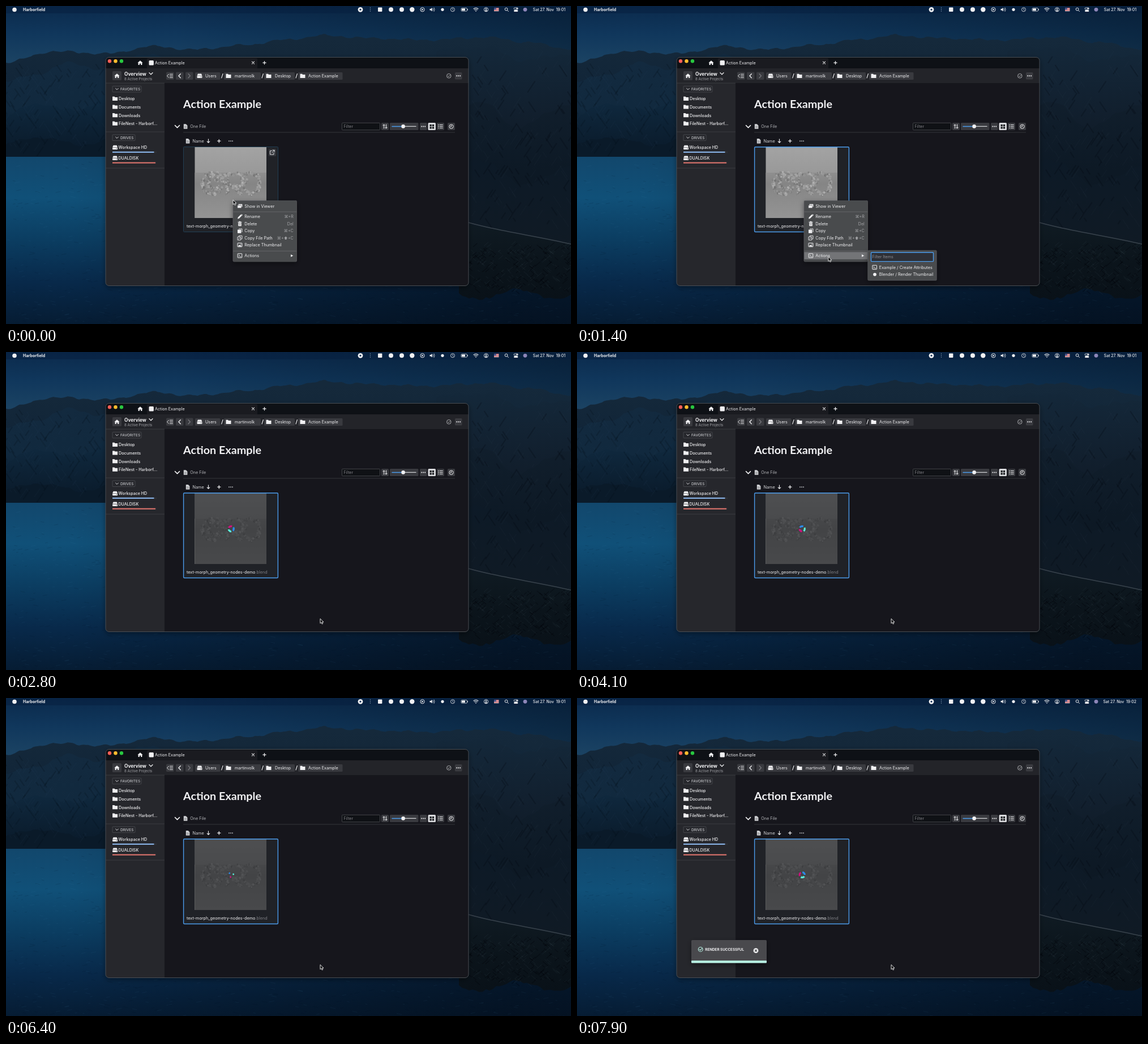
An HTML page with a canvas that plays this animation: 998x561 px, repeating every 8000 ms.

```html
<!DOCTYPE html>
<html lang="en">
<head>
<meta charset="utf-8">
<title>Context menu action</title>
<style>
html, body { margin: 0; width: 100%; height: 100%; overflow: hidden; background: #081c30; }
canvas, svg { position: absolute; left: 0; top: 0; width: 998px; height: 561px; display: block; }
text { font-family: Inter, "DejaVu Sans", sans-serif; white-space: pre; }
.title { font-family: Lato, sans-serif; }
</style>
</head>
<body>
<canvas id="scene" width="998" height="561"></canvas>
<svg id="ui" viewBox="0 0 998 561"></svg>
<script>
const LOOP = 8000, STEP = 100;

/* ---------- helpers ---------- */
function seeded(seed) {
  return () => {
    seed = (seed + 0x6d2b79f5) | 0;
    let t = Math.imul(seed ^ (seed >>> 15), 1 | seed);
    t = (t + Math.imul(t ^ (t >>> 7), 61 | t)) ^ t;
    return ((t ^ (t >>> 14)) >>> 0) / 4294967296;
  };
}
const clamp01 = v => Math.max(0, Math.min(1, v));
const progress = (t, a, b) => clamp01((t - a) / (b - a));
const smooth = x => x * x * (3 - 2 * x);
const mix = (a, b, k) => a + (b - a) * k;

/* ---------- landscape ---------- */
function paintScene() {
  const c = document.getElementById('scene').getContext('2d');
  const rnd = seeded(11);
  const grad = (x0, y0, x1, y1, ...stops) => {
    const g = c.createLinearGradient(x0, y0, x1, y1);
    stops.forEach((s, i) => g.addColorStop(i / (stops.length - 1), s));
    return g;
  };
  const fillRect = (fill, x, y, w, h) => { c.fillStyle = fill; c.fillRect(x, y, w, h); };
  const ridge = (pts, bottom, amp, fill) => {
    c.beginPath();
    c.moveTo(pts[0][0], bottom);
    for (let i = 1; i < pts.length; i++) {
      const [x0, y0] = pts[i - 1], [x1, y1] = pts[i];
      for (let x = x0; x <= x1; x += 4) {
        const bump = Math.sin(x * .21) + Math.sin(x * .083 + 2) + rnd() - .5;
        c.lineTo(x, mix(y0, y1, smooth((x - x0) / (x1 - x0))) + bump * amp);
      }
    }
    c.lineTo(pts[pts.length - 1][0], bottom);
    c.fillStyle = fill;
    c.fill();
  };
  const strokes = (n, x, y, w, h, dx, dy, colors) => {
    for (let i = 0; i < n; i++) {
      const px = x + rnd() * w, py = y + rnd() * h, k = .4 + rnd();
      c.strokeStyle = colors[i % colors.length];
      c.beginPath();
      c.moveTo(px, py);
      c.lineTo(px + dx * k, py + dy * k * (rnd() < .5 ? -1 : 1));
      c.stroke();
    }
  };

  fillRect(grad(0, 0, 0, 100, '#0b2a4c', '#10375c', '#1b4363'), 0, 0, 998, 110);
  fillRect(grad(300, 0, 998, 0, 'rgba(4,16,28,0)', 'rgba(4,16,28,.4)'), 0, 0, 998, 110);

  ridge([[0, 99], [85, 80], [180, 84], [260, 71], [330, 77], [420, 69], [490, 60], [560, 52],
    [650, 57], [740, 60], [850, 55], [920, 64], [1000, 76]], 300, 1.2, grad(0, 60, 0, 270, '#15293b', '#102437', '#0a1826'));
  ridge([[0, 132], [50, 122], [110, 100], [170, 112], [240, 86], [300, 92]], 300, 1.5,
    grad(0, 90, 0, 270, '#132a3f', '#11293e', '#091725'));
  ridge([[0, 190], [60, 172], [120, 186], [190, 156]], 290, 2, grad(0, 160, 0, 270, '#102a40', '#091827'));
  ridge([[0, 240], [70, 232], [130, 246], [190, 236]], 290, 1.5, '#0a1a29');
  c.lineWidth = 2;
  strokes(150, 0, 110, 176, 140, -9, 13, ['rgba(4,12,22,.22)', 'rgba(45,80,105,.08)']);

  fillRect(grad(0, 264, 0, 561, '#12476c', '#105078', '#0b3d61', '#08294a', '#061c33'), 0, 266, 998, 295);
  fillRect(grad(120, 0, 900, 0, 'rgba(3,12,24,0)', 'rgba(3,12,24,.62)'), 0, 266, 998, 295);
  c.lineWidth = 1;
  strokes(1000, 0, 272, 998, 289, 7, 1.5, ['rgba(90,160,200,.07)', 'rgba(0,10,26,.13)']);

  ridge([[760, 78], [850, 72], [910, 96], [1000, 84]], 340, 2, grad(0, 70, 0, 340, '#14283a', '#111e2c', '#0d1824'));
  ridge([[760, 190], [840, 168], [900, 214], [1000, 172]], 420, 2, grad(0, 160, 0, 420, '#111f2d', '#0d1925', '#0d1721'));
  ridge([[760, 300], [830, 270], [920, 315], [1000, 280]], 440, 2, grad(0, 270, 0, 440, '#0d1a27', '#101a24'));
  c.lineWidth = 2;
  strokes(170, 817, 95, 181, 290, 10, 15, ['rgba(3,9,16,.25)', 'rgba(60,82,100,.06)']);
  c.beginPath();
  c.moveTo(800, 382);
  c.lineTo(998, 421);
  c.lineTo(998, 503);
  for (let x = 998; x >= 800; x -= 6) c.lineTo(x, 506 + 9 * Math.sin(x * .047) + 5 * rnd());
  c.fillStyle = grad(0, 390, 0, 520, '#0f1a22', '#0b141b', '#091118');
  c.fill();
  c.lineWidth = 1.2;
  strokes(300, 817, 420, 181, 84, 7, 6, ['rgba(70,88,96,.13)', 'rgba(0,4,8,.35)']);
  c.strokeStyle = '#38424b';
  c.lineWidth = 1.5;
  c.beginPath();
  c.moveTo(800, 377);
  c.bezierCurveTo(860, 396, 930, 404, 998, 420);
  c.stroke();

  fillRect('rgba(7,30,62,.5)', 0, 0, 998, 13);
}

/* ---------- vector helpers ---------- */
const WHITE = '#f0f0f2', GREY = '#a3a4a8', BUTTON = '#393a3f', BLUE = '#4b9cec', PANEL = '#4a4b4e';
const text = (x, y, s, size = 7.2, fill = WHITE, weight = 400, more = '') =>
  `<text x="${x}" y="${y}" font-size="${size}" fill="${fill}" font-weight="${weight}" ${more}>${s}</text>`;
const rect = (x, y, w, h, fill, r = 0, more = '') =>
  `<rect x="${x}" y="${y}" width="${w}" height="${h}" rx="${r}" fill="${fill}" ${more}/>`;
const line = (d, stroke = WHITE, w = 1) =>
  `<path d="${d}" fill="none" stroke="${stroke}" stroke-width="${w}" stroke-linecap="round" stroke-linejoin="round"/>`;
const shape = (d, fill = WHITE) => `<path d="${d}" fill="${fill}"/>`;
const disc = (x, y, r, fill = WHITE, more = '') => `<circle cx="${x}" cy="${y}" r="${r}" fill="${fill}" ${more}/>`;
const ring = (x, y, r, stroke = WHITE, w = 1) => disc(x, y, r, 'none', `stroke="${stroke}" stroke-width="${w}"`);
const group = (id, body) => `<g id="${id}">${body}</g>`;

const folder = (x, y) => shape(`M${x - 4.5} ${y - 3.6}h3.4l1.2 1.2h4.4v6h-9z`);
const drive = (x, y) => shape(`M${x - 3} ${y - 3.8}h6l1.5 3.2h-9z`) + rect(x - 4.5, y, 9, 3.6, WHITE, .8) + disc(x + 2.6, y + 1.8, .6, '#333');
const file = (x, y) => shape(`M${x - 3.2} ${y - 4.2}h4l2.6 2.6v6h-6.6z`, '#cfd0d3') + line(`M${x - 1.6} ${y}h3.2m-3.2 2h3.2`, '#55565a', .6);
const home = (x, y) => shape(`M${x} ${y - 4}l4.6 4h-1.2v3.8h-2.3v-2.6h-2.2v2.6h-2.3v-3.8h-1.2z`);
const dots = (x, y, fill = WHITE) => [-3, 0, 3].map(d => disc(x + d, y, 1, fill)).join('');
const cross = (x, y, r, stroke = WHITE, w = 1.1) => line(`M${x - r} ${y - r}l${2 * r} ${2 * r}m0 ${-2 * r}l${-2 * r} ${2 * r}`, stroke, w);
const plus = (x, y) => line(`M${x - 2.6} ${y}h5.2m-2.6-2.6v5.2`, WHITE, 1.3);
const down = (x, y, r = 2.6, w = 1.2) => line(`M${x - r} ${y - r / 2}l${r} ${r}l${r} ${-r}`, WHITE, w);
const tag = (x, y, w, s) => rect(x, y, w, 10.5, 'none', 1, 'stroke="#4d4e53" stroke-width=".8"') +
  down(x + 8, y + 5.2, 2.4, .9) + text(x + 14, y + 7.7, s, 6.5, '#c4c5c9', 500);
const terminal = (x, y) => rect(x - 3.8, y - 3.6, 7.6, 7.2, 'none', .6, `stroke="${WHITE}"`) + line(`M${x - 1.8} ${y - 1.5}l1.6 1.5l-1.6 1.5m2.4 .2h1.4`, WHITE, .9);

/* ---------- interface parts ---------- */
function menuBar() {
  return disc(15, 6.5, 3.8) + text(30, 9, 'Harborfield', 7, WHITE, 700)
    + disc(626, 6.3, 4.4) + rect(624.6, 4.9, 2.8, 2.8, '#12345a', .5)
    + [3, 6, 9].map(y => disc(643.5, y, .7, '#8fa3b8')).join('')
    + rect(657, 2.6, 7.4, 7.4, WHITE, 1) + disc(680, 6.3, 4) + disc(699, 6.3, 4) + disc(717.3, 6.3, 4.2)
    + ring(735.5, 6.3, 3.6) + shape('M734.3 4.4l3.2 1.9l-3.2 1.9z')
    + shape('M748.5 5h1.8l2.4-2v6.6l-2.4-2h-1.8z') + line('M754.3 4.6q1.2 1.7 0 3.4m1.7-5q2.4 3.3 0 6.6', WHITE, .8)
    + disc(771, 6.3, 2.6) + ring(789, 6.3, 3.5, WHITE, .8) + line('M789 4.4v2.1l1.4 .9', WHITE, .7)
    + rect(804, 3.6, 10.5, 5.6, 'none', 1.4, `stroke="${WHITE}" stroke-width=".7"`) + rect(805, 4.6, 6, 3.6, WHITE, .6) + rect(815, 5.4, .9, 2, WHITE)
    + line('M826 5q4-3.5 8 0m-6.4 1.8q2.4-2 4.8 0', WHITE, 1.1) + disc(830, 8.7, .9)
    + ring(848, 6.3, 3.6, WHITE, .9) + disc(848, 5.4, 1.2) + shape('M845.8 8.6q2.2-2.6 4.4 0q-2.2 1.4-4.4 0')
    + rect(862, 3.3, 8.4, 6, '#e9dcdc') + [3.3, 5.3, 7.3].map(y => rect(862, y, 8.4, 1, '#c8404a')).join('') + rect(862, 3.3, 3.8, 3, '#38508c')
    + ring(883.6, 5.7, 2.4) + line('M885.5 7.6l2 2')
    + rect(897, 3, 7.4, 3, 'none', 1.5, `stroke="${WHITE}" stroke-width=".8"`) + disc(902.6, 4.5, 1.2) + rect(897, 7, 7.4, 3, WHITE, 1.5)
    + disc(917, 6.3, 3.4, '#8d86b8')
    + `<text id="clock" x="988" y="8.9" font-size="6.9" fill="${WHITE}" font-weight="500" text-anchor="end"></text>`;
}

function crumb(x, w, icon, s, tx) {
  return rect(x, 117, w, 13, BUTTON, 1.5) + icon(x + 8, 123.3) + text(tx, 126, s);
}

function windowFrame() {
  const boxed = (x, y, w, h) => rect(x, y, w, h, BUTTON, 1.5);
  return rect(176, 90.5, 641, 403, '#13161b', 6, 'filter="url(#soft)"')
    + `<g clip-path="url(#win)">` + rect(176, 90, 641, 21, '#0e1116') + rect(249, 92, 195, 19, '#1a1b20', 2)
    + rect(176, 110, 641, 26, '#232429') + rect(176, 136, 104, 358, '#26272c')
    + [136, 222, 286].map(y => rect(176, y - .5, 104, 1, '#3b3c41')).join('') + '</g>'
    + rect(176, 90.5, 641, 403, 'none', 6, 'stroke="#50545a" stroke-width=".9"')
    + disc(183, 97.2, 3.2, '#ff5f57') + disc(193.5, 97.2, 3.2, '#febc2e') + disc(204, 97.2, 3.2, '#28c840')
    + home(237, 100.2) + rect(252.5, 96, 8.4, 8.4, WHITE, 1.5) + text(263, 102.7, 'Action Example')
    + cross(436.5, 100.2, 2) + plus(456.5, 100.2)
    + boxed(188, 115, 16, 16) + home(196, 123.3) + text(209, 122.7, 'Overview', 8.3, WHITE, 700) + down(256, 119.3, 3, 1.3)
    + text(209, 130.7, '8 Active Projects', 6.2, GREY)
    + boxed(283, 116.5, 13.5, 13.5) + line('M287.5 120.3l-3 3l3 3m2-6h5m-5 3h5m-5 3h5')
    + boxed(300, 116.5, 13.5, 13.5) + line('M308.3 119.8l-3.4 3.5l3.4 3.5', WHITE, 1.3)
    + boxed(317, 116.5, 13.5, 13.5) + line('M322 119.8l3.4 3.5l-3.4 3.5', '#77787c', 1.3)
    + crumb(334, 44.5, drive, 'Users', 352) + crumb(385, 65, folder, 'martinvolk', 404)
    + crumb(456, 54, folder, 'Desktop', 475) + crumb(516, 78.5, folder, 'Action Example', 534)
    + [381.7, 453, 513].map(x => line(`M${x - 1} 127l2.4-7.5`, WHITE, 1.1)).join('')
    + ring(782.3, 123.3, 3.8, '#b9babd', .9) + line('M780.5 123.4l1.4 1.4l2.4-2.7', '#b9babd', .9)
    + boxed(793, 117, 12.5, 12.5) + dots(799.2, 123.3);
}

function sidebar() {
  const places = ['Desktop', 'Documents', 'Downloads', 'FileNest - Harborf...'];
  return tag(188, 141.3, 51, 'FAVORITES')
    + places.map((s, i) => folder(192.6, 163.4 + i * 14.6) + text(199, 166.4 + i * 14.6, s, 7.2, WHITE, 500)).join('')
    + tag(188, 227, 40, 'DRIVES')
    + drive(192.6, 249.6) + text(198.5, 252.2, 'Workspace HD', 7.1, WHITE, 500) + rect(188, 256.8, 78, 2, '#303136') + rect(188, 256.8, 73.5, 2, '#8fbcf4')
    + drive(192.6, 268.4) + text(198.5, 271, 'DUALDISK', 7.1, WHITE, 500) + rect(188, 275.6, 78, 2, '#303136') + rect(188, 275.6, 76, 2, '#e5766e');
}

function content() {
  const boxed = (x, w, fill = BUTTON) => rect(x, 206, w, 13, fill, 1.5);
  return text(313, 180, 'Action Example', 19.8, WHITE, 700, 'class="title"')
    + down(302.5, 212.6, 4, 1.5) + file(317, 212.4) + text(325.3, 215.3, 'One File', 7.2, '#b4b5b9')
    + rect(593.5, 206.3, 67, 12.4, '#0f1115', 1, 'stroke="#4a4b50" stroke-width=".9"') + text(596.5, 215, 'Filter', 7, '#808186')
    + boxed(663, 13) + line('M667.6 216v-7l-1.7 1.8m1.7-1.8l1.7 1.8m2.2-1.8v7l-1.7-1.8m1.7 1.8l1.7-1.8')
    + boxed(678, 50.5) + line('M682 212.4h20', BLUE, 1.5) + line('M702 212.4h22', '#d0d1d4', 1.3) + disc(701.6, 212.4, 3.3)
    + boxed(731, 12.5) + dots(737.2, 212.4) + boxed(745.5, 13.5, '#d9dadd')
    + [748.5, 752.8].map(x => [209, 213.2].map(y => rect(x, y, 3.3, 3.3, '#1d1e22')).join('')).join('')
    + boxed(761, 13) + [209.6, 212.4, 215.2].map(y => disc(764, y, .8) + line(`M766.3 ${y}h5`)).join('')
    + boxed(780, 13) + ring(786.5, 212.6, 3.6) + line('M786.5 210.6v2.2h-1.5')
    + rect(313, 222.4, 480, 1, '#34363b')
    + file(321, 238.2) + text(329.5, 240.9, 'Name', 7.3, '#d4d5d8') + line('M357.5 234.8v6.4m-2.2-2.2l2.2 2.2l2.2-2.2', WHITE, 1.1)
    + plus(376.3, 238.2) + dots(397, 238.2, '#b4b5b9');
}

function pebbles() {
  const rnd = seeded(5), out = [];
  const put = (x, y) => {
    const v = 115 + Math.floor(rnd() * 62);
    out.push(disc((x + rnd() * 6 - 3).toFixed(1), (y + rnd() * 6 - 3).toFixed(1), (1 + rnd() * 1.5).toFixed(1), `rgb(${v},${v},${v})`));
  };
  const loop = (x, y, rx, ry, from, to, n) => {
    for (let i = 0; i < n; i++) {
      const a = mix(from, to, i / n);
      put(x + rx * Math.cos(a), y + ry * Math.sin(a));
    }
  };
  loop(365, 313, 17, 18, .5, 5.9, 120);
  loop(365, 313, 9, 10, .5, 5.9, 60);
  loop(403, 307, 20, 11, 0, 6.28, 100);
  for (let i = 0; i < 35; i++) { put(391, mix(305, 333, i / 35)); put(mix(400, 416, i / 35), mix(316, 333, i / 35)); }
  loop(433, 313, 15, 18, 0, 6.28, 120);
  return out.join('');
}

function tile() {
  return rect(313.5, 248.5, 167, 150, '#202227', 1)
    + rect(333.5, 249, 126.5, 125, 'url(#wall)') + rect(333.5, 294, 126.5, 80, 'url(#floor)') + pebbles()
    + group('shade', rect(333.5, 249, 126.5, 125, '#1f2023'))
    + text(319, 391.2, 'text-morph_geometry-nodes-demo<tspan fill="#7d7e83">.blend</tspan>', 7.25)
    + group('idle', rect(313.5, 248.5, 167, 150, 'none', 1, 'stroke="#213f54"') + rect(464, 252, 13, 13, '#34363b', 1.5)
      + line('M469.5 255.5h-3v6.5h6.5v-3m-3.5 0l4.6-4.6m-3 0h3v3', WHITE, .9))
    + group('selected', rect(313.6, 248.7, 166.8, 149.8, 'none', 1.5, `stroke="${BLUE}" stroke-width="1.4"`))
    + group('spinner', ['#d0107e', '#2c8bea', '#5cf0dc'].map(col => `<path fill="none" stroke="${col}"/>`).join(''));
}

const ROWS = [
  [355.6, 'Show in Viewer', ''], [374.2, 'Rename', '⌘+R'], [386.7, 'Delete', 'Del'], [399.2, 'Copy', '⌘+C'],
  [411.6, 'Copy File Path', '⌘+⬆+C'], [424.1, 'Replace Thumbnail', ''], [443, 'Actions', '']
];

function menu() {
  const x = 413, icons = [
    y => rect(x - 2.6, y - 3.4, 7, 5, WHITE, .5) + rect(x - 4.2, y - 1.4, 7, 5, WHITE, .5, `stroke="${PANEL}" stroke-width=".6"`),
    y => shape(`M${x - 4} ${y + 4}l.8-2.8l5-5l2 2l-5 5zM${x + 2.4} ${y - 3.8}l1-.6l1.6 1.6l-.6 1z`),
    y => shape(`M${x - 3.4} ${y - 3.4}h2l.6-.9h1.6l.6 .9h2v1.2h-6.8z`) + rect(x - 2.8, y - 1.7, 5.6, 5.8, WHITE, .7) + line(`M${x - 1} ${y - .2}v2.8m2-2.8v2.8`, '#555', .6),
    y => line(`M${x - 1.5} ${y - 3.5}h5.5v5.5`, WHITE, .9) + rect(x - 4, y - 2.2, 6.4, 6.4, WHITE, .5),
    y => rect(x - 1.6, y - 3.8, 5.6, 5.8, 'none', .4, `stroke="${WHITE}" stroke-width=".9"`) + rect(x - 4, y - 1.8, 5.6, 5.8, PANEL, .4, `stroke="${WHITE}" stroke-width=".9"`) + line(`M${x - 2.4} ${y + 2.4}l2.4-2.4`, WHITE, .9),
    y => rect(x - 4, y - 3.3, 8, 6.6, 'none', .6, `stroke="${WHITE}"`) + shape(`M${x - 3} ${y + 2.4}l2-3l1.5 1.6l1-1l1.5 2.4z`) + disc(x + 1.8, y - 1.3, .8),
    y => terminal(x, y)
  ];
  return rect(401, 343.4, 112.5, 107.4, PANEL, 1.5, 'stroke="#5b5c5f" stroke-width=".7" filter="url(#soft)"')
    + group('hover', rect(401.4, 0, 111.7, 12.8, '#737477'))
    + [362.6, 431.8].map(y => rect(401.4, y, 111.8, .9, '#68696c')).join('')
    + ROWS.map(([y, label, keys], i) => icons[i](y - 2.6) + text(421.3, y, label, 7.25)
      + text(507.8, y, keys, 7.1, '#a2a3a6', 400, 'text-anchor="end"')).join('')
    + shape('M503 438.3l4.3 2.2l-4.3 2.2z');
}

function submenu() {
  return rect(513.8, 431.2, 121.4, 52.8, PANEL, 1.5, 'stroke="#5b5c5f" stroke-width=".7" filter="url(#soft)"')
    + rect(519.5, 434.8, 110, 15.8, '#2e3036', 1.2, `stroke="${BLUE}" stroke-width="1.4"`) + text(521.5, 445.2, 'Filter Items', 7.1, '#8f9095')
    + group('subhover', rect(514.2, 467.3, 120.6, 12.6, '#737477'))
    + terminal(525.6, 461) + text(533.8, 463.7, 'Example / Create Attributes', 7.25)
    + group('runItem', disc(526, 473.6, 2.9) + text(533.8, 476.3, 'Blender / Render Thumbnail', 7.25));
}

function toast() {
  return rect(202, 427, 133, 40.4, '#494a4e', 2, 'filter="url(#soft)"') + rect(202, 463.2, 133, 4.2, '#b8f2e4', 1)
    + ring(218.2, 443.4, 3.9, '#b8f2e4', 1.1) + line('M216.3 443.5l1.5 1.5l3-3.4', '#b8f2e4', 1.1)
    + text(226.3, 445.6, 'RENDER SUCCESSFUL', 6.3, WHITE, 700)
    + disc(316, 445.7, 4.4) + cross(316, 445.7, 1.5, '#333438', 1.2);
}

paintScene();
const ui = document.getElementById('ui');
ui.innerHTML = `<defs>
  <clipPath id="win">${rect(176, 90.5, 641, 403, '#000', 6)}</clipPath>
  <filter id="soft" x="-20%" y="-20%" width="140%" height="150%"><feDropShadow dx="0" dy="3" stdDeviation="5" flood-color="#000" flood-opacity=".42"/></filter>
  <linearGradient id="wall" x2="0" y2="1"><stop stop-color="#a3a3a3"/><stop offset=".5" stop-color="#959595"/></linearGradient>
  <linearGradient id="floor" x2="0" y2="1"><stop stop-color="#8f8f8f"/><stop offset=".25" stop-color="#858585"/><stop offset="1" stop-color="#949494"/></linearGradient>
  </defs>`
  + menuBar() + windowFrame() + sidebar() + content() + tile()
  + group('menu', menu()) + group('submenu', submenu()) + group('toast', toast())
  + group('click', disc(0, 0, 11, 'rgba(15,16,18,.72)', 'stroke="#17181a" stroke-width="2"') + ring(0, 0, 10.4, WHITE, 1.1) + ring(0, 0, 7.6, '#c9cacc', .8))
  + group('cursor', `<path d="M0 0v8.2l1.9-1.7l1.3 2.9l1.5-.7l-1.3-2.8h2.6z" fill="#0c0d0f" stroke="#f4f4f4" stroke-width=".9" stroke-linejoin="round"/>`);

/* ---------- motion ---------- */
const part = Object.fromEntries([...ui.querySelectorAll('[id]')].map(e => [e.id, e]));
const alpha = (id, v) => part[id].setAttribute('opacity', v);
const place = (id, x, y) => part[id].setAttribute('transform', `translate(${x} ${y})`);
const POINTER = [[100, 401, 342], [500, 435, 440], [1300, 435, 440], [1900, 555, 470.5]];

function pointerAt(t) {
  let pos = POINTER[0].slice(1);
  for (let i = 1; i < POINTER.length; i++) {
    const [t0, x0, y0] = POINTER[i - 1], [t1, x1, y1] = POINTER[i];
    if (t >= t0) {
      const k = smooth(progress(t, t0, t1));
      pos = [mix(x0, x1, k), mix(y0, y1, k)];
    }
  }
  return pos;
}

function drawSpinner(t) {
  const held = t >= 3000 && t < 3400 ? 3000 : t;
  const k = clamp01((((held - 500) % 1000) + 1000) % 1000 / 900);
  const turn = -2 * Math.PI * (1 - Math.pow(1 - k, 2.3));
  const open = clamp01(Math.sin(Math.PI * k) * 1.25);
  const radius = mix(4.1, 4.6, open), half = mix(.01, .72, open);
  [...part.spinner.children].forEach((arc, i) => {
    const mid = (105 + i * 120) * Math.PI / 180 + turn;
    const at = a => `${(397.7 + radius * Math.cos(a)).toFixed(2)} ${(312 + radius * Math.sin(a)).toFixed(2)}`;
    arc.setAttribute('d', `M${at(mid - half)}A${radius} ${radius} 0 0 1 ${at(mid + half)}`);
    arc.setAttribute('stroke-width', mix(2.8, 3.2, open));
    arc.setAttribute('stroke-linecap', open < .5 ? 'round' : 'butt');
  });
}

function render(t) {
  const [x, y] = pointerAt(t);
  const selected = progress(t, 0, 200), loading = progress(t, 2200, 2500);
  place('cursor', x, y);
  alpha('selected', selected);
  alpha('idle', 1 - selected);

  const row = x > 500 ? ROWS[6] : ROWS.find(r => y >= r[0] - 9 && y < r[0] + 3.7);
  part.hover.firstChild.setAttribute('y', row ? row[0] - 8.9 : 0);
  alpha('hover', row ? 1 : 0);
  alpha('menu', 1 - progress(t, 2100, 2300));
  alpha('submenu', t < 1300 ? 0 : 1 - progress(t, 2100, 2300));
  alpha('subhover', t >= 1700 && t < 2000 ? 1 : 0);
  alpha('runItem', t < 2000 ? 1 : .3);

  place('click', 555, 472);
  alpha('click', t >= 2000 ? 1 - progress(t, 2100, 2400) : 0);

  alpha('shade', .64 * loading);
  alpha('spinner', loading);
  drawSpinner(t);

  alpha('toast', smooth(progress(t, 7500, 7800)));
  part.clock.textContent = `Sat 27. Nov  19:0${t < 7000 ? 1 : 2}`;
}

function tick() {
  const t = performance.now() % LOOP;
  render(Math.floor(t / STEP) * STEP);
  requestAnimationFrame(tick);
}
tick();
</script>
</body>
</html>
```
